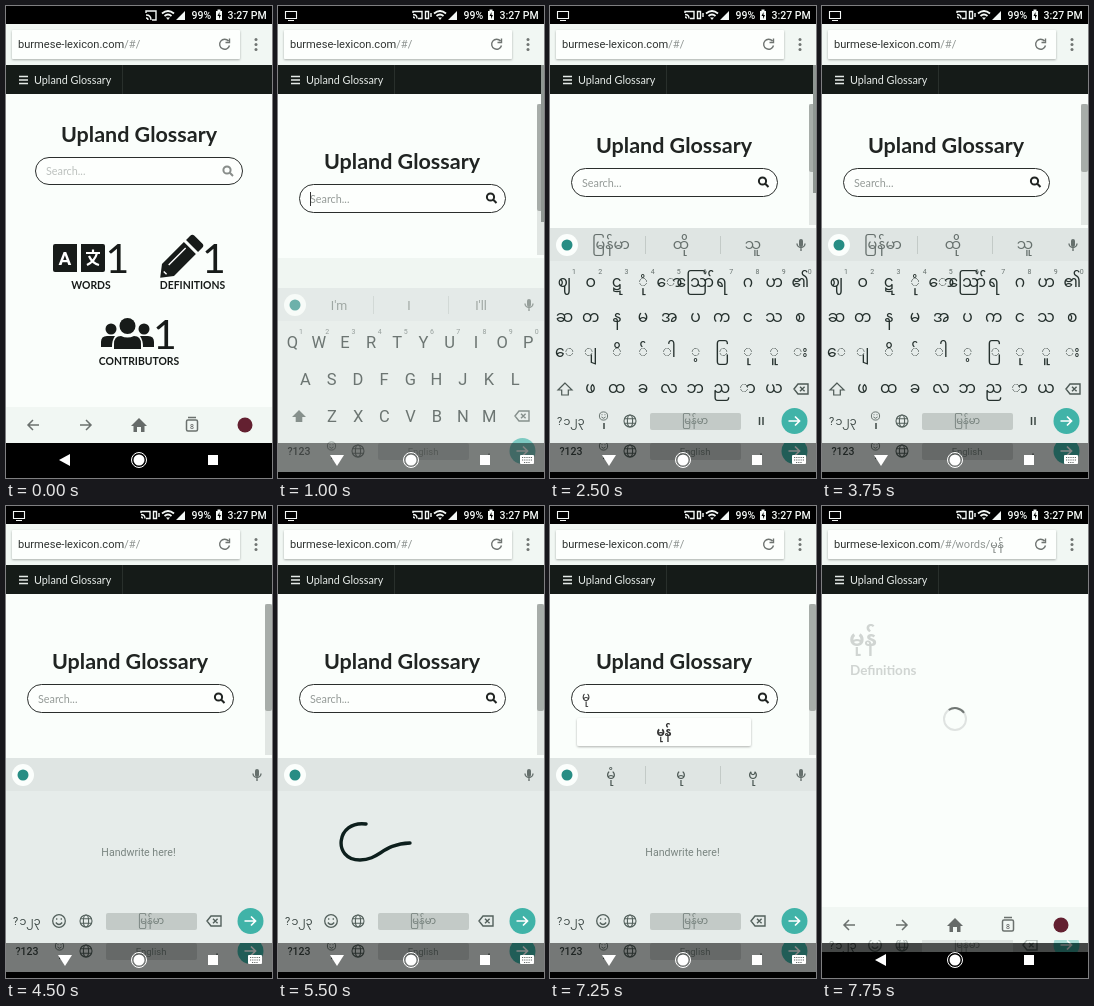
Animation, 266 px wide and 472 px high, one loop 8 s. Source, as an HTML page:

```html
<!DOCTYPE html>
<html lang="en">
<head>
<meta charset="utf-8">
<title>Dictionary on a phone</title>
<style>
html, body { margin: 0; height: 100%; overflow: hidden; background: #000; }
svg { display: block; width: 100vw; height: 100vh; }
text { font-family: Roboto, sans-serif; }
.lato { font-family: Lato, sans-serif; }
.b { font-weight: 700; }
.mid { text-anchor: middle; }
.my { font-family: "Noto Sans Myanmar", "Noto Sans", sans-serif; text-anchor: middle; }
.line { fill: none; stroke: currentColor; stroke-width: 1.4; }

.timed { animation: 8s step-end infinite; }
.cast { animation-name: cast; }
.screen { animation-name: screen; }
.home { animation-name: home; }
.typing { animation-name: typing; }
.content { animation-name: content; }
.tall { animation-name: tall; }
.short, .burmese { animation-name: short; }
.scrolled { animation-name: scrolled; }
.rescrolled { animation-name: rescrolled; }
.latin { animation-name: latin; }
.ghost { animation-name: ghost; }
.hand { animation-name: hand; }
.hint { animation-name: hint; }
.empty { animation-name: empty; }
.found { animation-name: found; }
.word { animation-name: word; }
@keyframes cast { 0% { opacity: 1 } 3.125%, to { opacity: 0 } }
@keyframes screen { 0% { opacity: 0 } 3.125%, to { opacity: 1 } }
@keyframes home { 0% { opacity: 1 } 12.5%, to { opacity: 0 } }
@keyframes typing { 0% { opacity: 0 } 12.5% { opacity: 1 } 93.75%, to { opacity: 0 } }
@keyframes content { 0% { transform: none } 28.125% { transform: translateY(-16px) } 50%, to { transform: none } }
@keyframes tall { 0% { opacity: 1 } 28.125% { opacity: 0 } 50%, to { opacity: 1 } }
@keyframes short { 0% { opacity: 0 } 28.125% { opacity: 1 } 50%, to { opacity: 0 } }
@keyframes scrolled { 0% { opacity: 0 } 12.5% { opacity: 1 } 15.625%, to { opacity: 0 } }
@keyframes rescrolled { 0% { opacity: 0 } 28.125% { opacity: 1 } 34.375%, to { opacity: 0 } }
@keyframes latin {
  0% { opacity: 0; transform: translateY(30px) }
  12.5% { opacity: .65; transform: translateY(30px) }
  15.625% { opacity: 1; transform: none }
  28.125%, to { opacity: 0; transform: none }
}
@keyframes ghost { 0% { opacity: 0 } 15.625% { opacity: 1 } 93.75%, to { opacity: 0 } }
@keyframes hand { 0% { opacity: 0 } 50% { opacity: 1 } 93.75%, to { opacity: 0 } }
@keyframes hint { 0% { opacity: 1 } 62.5% { opacity: 0 } 78.125%, to { opacity: 1 } }
@keyframes empty { 0% { opacity: 1 } 78.125%, to { opacity: 0 } }
@keyframes found { 0% { opacity: 0 } 78.125%, to { opacity: 1 } }
@keyframes word { 0% { opacity: 0 } 93.75%, to { opacity: 1 } }

.ink { fill: none; stroke: #0d1f1d; stroke-width: 3.4; stroke-linecap: round; stroke-linejoin: round; animation: slide 8s linear infinite; }
.ink path { stroke-dasharray: 1 2; animation: 8s linear infinite; }
.ink .s1 { animation-name: s1; }
.ink .s2 { animation-name: s2; }
.ink .s3 { animation-name: s3; }
@keyframes s1 { 0%, 62% { stroke-dashoffset: 1.2 } 68.75%, to { stroke-dashoffset: 0 } }
@keyframes s2 { 0%, 68.75% { stroke-dashoffset: 1.2 } 71.875%, to { stroke-dashoffset: 0 } }
@keyframes s3 { 0%, 71.875% { stroke-dashoffset: 1.2 } 75%, to { stroke-dashoffset: 0 } }
@keyframes slide {
  0%, 75% { transform: translateX(110px) }
  81.25% { transform: none }
  84.375%, to { transform: translateX(-110px) }
}
.spin { transform-origin: 133px 213px; animation: spin 1s linear -.25s infinite; }
@keyframes spin { to { transform: rotate(360deg) } }
</style>
</head>
<body>
<svg viewBox="0 0 266 472" preserveAspectRatio="none">
<defs>
  <clipPath id="below"><rect y="437" width="266" height="29"/></clipPath>
  <clipPath id="edge"><rect y="434" width="266" height="12"/></clipPath>
  <clipPath id="keys"><rect y="252" width="266" height="214"/></clipPath>
  <filter id="shade" x="-5%" y="-20%" width="110%" height="150%"><feDropShadow dx="0" dy="1" stdDeviation="1" flood-opacity=".3"/></filter>
  <g id="lens" class="line" style="stroke-width:2"><circle r="3.6" cx="-1" cy="-1"/><path d="M1.8 1.8 5 5"/></g>
  <g id="globe" class="line" style="stroke-width:1.1"><circle r="6"/><ellipse rx="2.6" ry="6"/><path d="M-5.5-2.2H5.5M-5.5 2.2H5.5"/></g>
  <g id="smile" class="line" style="stroke-width:1.3"><circle r="6.3"/><path d="M-3.2 1.5Q0 5.5 3.2 1.5M-2.3-2.7v1.5M2.3-2.7v1.5"/></g>
  <path id="erase" class="line" d="M-7 0-3-5H7V5H-3ZM-1-2.3 3.6 2.3M3.6-2.3-1 2.3"/>
  <path id="shift" d="M0-6-7 1H-3.3V6H3.3V1H7Z"/>
  <g id="mic"><rect x="-2" y="-6" width="4" height="8" rx="2"/><path class="line" d="M-4-1.5a4 4 0 0 0 8 0M0 3V6"/></g>
  <g id="strip">
    <rect width="266" height="33" fill="#dfe5e3"/>
    <circle cx="17" cy="17" r="11" fill="#fbfefc"/><circle cx="17" cy="17" r="5.5" fill="#278d84"/>
    <use href="#mic" x="251" y="17" fill="#66706d" color="#66706d"/>
  </g>
  <path id="bars" d="M95.5 8v18M170.5 8v18" stroke="#c3cac7"/>
  <g id="base" color="#53605c">
    <use href="#globe" x="80" y="415"/>
    <rect x="100" y="407" width="91" height="17" rx="2" fill="#c3cac7"/>
    <circle cx="244.5" cy="415" r="13" fill="#40b3a8"/>
    <path d="M238.5 415h11M245 410.5l4.500 4.500-4.500 4.500" fill="none" stroke="#fff" stroke-width="1.700"/>
  </g>
  <use id="smallSmile" href="#smile" transform="translate(53.500 410) scale(.65)"/>
  <g id="latinRow" fill="#3c4744" color="#53605c">
    <use href="#base"/><use href="#smallSmile"/>
    <text class="mid" x="21" y="419" font-size="10.500" font-weight="500">?123</text>
    <text class="mid" x="54" y="421" font-size="13">,</text>
    <text class="mid" x="145" y="419" font-size="9.500" fill="#75807c">English</text>
    <text class="mid" x="211" y="419" font-size="14">.</text>
  </g>
  <g id="digits" fill="#3c4744">
    <text x="7" y="419" font-size="11">?</text><text class="my" x="24" y="419" font-size="11">၁၂၃</text>
    <text class="my" x="145" y="418" font-size="10" fill="#75807c">မြန်မာ</text>
  </g>
  <g id="handRow" color="#53605c">
    <use href="#base"/><use href="#digits"/>
    <use href="#smile" x="53" y="415"/><use href="#erase" x="208" y="415"/>
  </g>
  <g id="homeKeys" fill="#fff">
    <circle cx="133" cy="454" r="5.500"/><circle cx="133" cy="454" r="7.500" fill="none" stroke="#fff"/>
    <rect x="202" y="449" width="10" height="10"/>
  </g>
  <g id="softNav"><use href="#homeKeys"/><path d="M53 454 64 448V460Z" fill="#fff"/></g>
  <g id="toolbar">
    <rect y="401" width="266" height="36" fill="#f1f7f3"/>
    <g class="line" color="#6b716e" style="stroke-width:1.500">
      <path d="M33 419H22M27 414l-5 5 5 5"/><path d="M74 419H85M80 414l5 5-5 5"/>
      <rect x="180.500" y="414" width="11" height="11" rx="1.500"/><path d="M182 411.500h8"/>
    </g>
    <path d="M125 420 133 412 141 420H138.500V426H135V421H131V426H127.500V420Z" fill="#666b69"/>
    <text class="mid" x="186" y="422.500" font-size="7" fill="#555">8</text>
    <circle cx="239" cy="419" r="7.500" fill="#632030"/>
  </g>
</defs>

<rect width="266" height="472" fill="#fafefb"/>
<rect y="18" width="266" height="41" fill="#f1f7f3"/>
<rect x="6" y="24" width="228" height="29" rx="1" fill="#fdfffd" filter="url(#shade)"/>
<text x="12" y="42" font-size="11.100" fill="#303432">burmese-lexicon.com<tspan fill="#909693">/#/</tspan></text>
<path class="line" color="#707572" d="M222.500 35A5 5 0 1 0 223.500 39.500M223.500 32.500V36.500H219.500"/>
<g fill="#707572"><circle cx="250" cy="33.500" r="1.500"/><circle cx="250" cy="38.500" r="1.500"/><circle cx="250" cy="43.500" r="1.500"/></g>
<rect y="59" width="266" height="29" fill="#151b18"/>
<path d="M116.500 59V88" stroke="#29302c"/>
<path d="M13 70.500h9M13 74h9M13 77.500h9" stroke="#e6ebe8" stroke-width="1.500"/>
<text class="lato" x="28" y="78" font-size="10.800" fill="#e6ebe8">Upland Glossary</text>

<g class="timed home">
  <text class="lato b mid" x="133" y="136" font-size="21.500" fill="#202422">Upland Glossary</text>
  <rect x="29.500" y="151.500" width="207" height="27" rx="13.500" fill="#fdfffd" stroke="#2a2e2c"/>
  <text class="lato" x="40" y="169" font-size="10.800" fill="#bcc1be">Search...</text>
  <use href="#lens" x="222" y="165" color="#888d8a"/>
  <g fill="#171b19">
    <path d="M49 238H71V266H49a2 2 0 0 1-2-2V240a2 2 0 0 1 2-2ZM75 238H97a2 2 0 0 1 2 2V264a2 2 0 0 1-2 2H75Z"/>
    <text class="b mid" x="59" y="258.500" font-size="19" fill="#fff">A</text>
    <path d="M80 247H94M87 243.500V247M91 247Q89 255 81 259M83 250Q86 257 93 259" fill="none" stroke="#fff" stroke-width="2.200"/>
    <g transform="translate(174 252) rotate(-45)">
      <path d="M-28 0-17-8.500H14V8.500H-17ZM17-8.500H23a3 3 0 0 1 3 3V5.500a3 3 0 0 1-3 3H17Z"/>
      <path d="M-13-3H11M-21-2V2" stroke="#fff" stroke-width="1.400"/>
    </g>
    <circle cx="105" cy="323" r="5.500"/><circle cx="138" cy="323" r="5.500"/>
    <path d="M95 341V336q0-6 6-6h8q-3 4-3 11ZM148 341V336q0-6-6-6h-8q3 4 3 11Z"/>
    <circle cx="121.500" cy="320" r="8"/>
    <path d="M108 343V338q0-8 7-8 6.500 3 13 0 7 0 7 8V343Z"/>
    <g class="mid" font-size="41"><text class="lato" x="111.500" y="267">1</text><text class="lato" x="208" y="267">1</text><text class="lato" x="159" y="343">1</text></g>
    <g class="mid" font-size="10.400"><text class="lato b" x="85" y="283">WORDS</text><text class="lato b" x="186.500" y="283">DEFINITIONS</text><text class="lato b" x="133" y="359">CONTRIBUTORS</text></g>
  </g>
  <use href="#toolbar"/>
  <rect y="437" width="266" height="35"/>
  <use href="#softNav"/>
</g>

<g class="timed typing">
  <g class="timed content">
    <text class="lato b mid" x="124" y="163" font-size="21.500" fill="#202422">Upland Glossary</text>
    <rect x="21.500" y="178.500" width="206" height="28" rx="14" fill="#fdfffd" stroke="#2a2e2c"/>
    <text class="lato timed empty" x="32" y="196.500" font-size="10.800" fill="#949a97">Search...</text>
    <path class="timed scrolled" d="M32.500 186V200" stroke="#333"/>
    <use href="#lens" x="213.500" y="192" color="#202422"/>
  </g>
  <g class="timed found" fill="#333">
    <text class="my" x="36" y="195" font-size="12">မု</text>
    <rect x="27" y="212" width="174" height="28" rx="2" fill="#fdfffd" filter="url(#shade)"/>
    <text class="my b" x="114" y="230" font-size="12">မုန်</text>
  </g>
  <g class="timed tall"><rect x="259" y="98" width="7" height="151" fill="#e1e6e3"/><rect x="259" y="98" width="7" height="107" rx="2" fill="#a7ada9"/></g>
  <g class="timed short"><rect x="259" y="98" width="7" height="121" fill="#e1e6e3"/><rect x="259" y="98" width="7" height="68" rx="2" fill="#a7ada9"/></g>
  <rect class="timed scrolled" x="263" y="59" width="3" height="157" fill="#8f9692"/>
  <rect class="timed rescrolled" x="263" y="59" width="3" height="128" fill="#8f9692"/>
  <rect y="252" width="266" height="214" fill="#f0f6f2"/>

  <g clip-path="url(#keys)"><g class="timed latin">
    <rect y="252" width="266" height="214" fill="#e6ecea"/>
    <use href="#strip" y="252"/><use href="#bars" y="252"/>
    <g class="mid" font-size="12.500" fill="#737d79"><text x="61" y="273.500">I'm</text><text x="131" y="273.500">I</text><text x="203" y="273.500">I'll</text></g>
    <g id="latinKeys" fill="#25302d" font-size="16.500"></g>
    <use href="#shift" x="21" y="380" fill="#4d5955"/><use href="#erase" x="244" y="380" color="#4d5955"/>
    <use href="#latinRow"/>
  </g></g>

  <g class="timed burmese">
    <rect y="222" width="266" height="244" fill="#e6ecea"/>
    <use href="#strip" y="222"/><use href="#bars" y="222"/>
    <g fill="#66706d" font-size="14.500"><text class="my" x="61" y="243">မြန်မာ</text><text class="my" x="131" y="243">ထို</text><text class="my" x="203" y="243">သူ</text></g>
    <g id="burmeseKeys" fill="#25302d" font-size="15.500"></g>
    <use href="#shift" class="line" x="15" y="383" color="#4d5955" style="stroke-width:1.200"/><use href="#erase" x="251" y="383" color="#4d5955"/>
    <use href="#base"/><use href="#digits"/>
    <g color="#53605c"><use href="#smallSmile"/></g>
    <path d="M54 417v6M209.500 411v8M213 411v8" stroke="#3c4744" stroke-width="1.500"/>
  </g>

  <g class="timed hand">
    <rect y="252" width="266" height="214" fill="#e6ecea"/>
    <use href="#strip" y="252"/>
    <g class="timed found" fill="#4d5955" font-size="14"><use href="#bars" y="252"/><text class="my" x="61" y="273">မုံ</text><text class="my" x="131" y="273">မု</text><text class="my" x="203" y="273">ဗု</text></g>
    <text class="mid timed hint" x="132.500" y="350" font-size="10.600" fill="#7a8581">Handwrite here!</text>
    <g clip-path="url(#keys)"><g class="ink">
      <path class="s1" pathLength="1" d="M-22 318C-52 314-56 354-28 354C-8 354-6 338 22 337"/>
      <path class="s2" pathLength="1" d="M26 312C40 319 38 334 26 344Q16 350 0 353"/>
      <path class="s3" pathLength="1" d="M22 359Q12 366 9 378Q8 386 17 384L30 379"/>
    </g></g>
    <use href="#handRow"/>
  </g>

  <g class="timed ghost" clip-path="url(#below)"><rect y="437" width="266" height="29" fill="#e0e6e4"/><use href="#latinRow" y="30"/></g>
  <rect y="437" width="266" height="29" opacity=".48"/>
  <rect y="466" width="266" height="6"/>
  <use href="#homeKeys"/>
  <path d="M52 449H66L59 460Z" fill="#fff"/>
  <rect x="242" y="449" width="14" height="9" rx="1" fill="#fff"/>
  <path d="M244 451.500h10M244 454h10M246 456.500h6" stroke="#626967" stroke-dasharray="1.200 1"/>
</g>

<g class="timed word">
  <text x="133.500" y="42" font-size="11.100" fill="#909693">words/</text>
  <text class="my" x="175" y="42" font-size="11" fill="#7c827f">မုန်</text>
  <g fill="#d0d5d2"><text class="my b" x="41" y="140" font-size="22">မုန်</text><text class="lato b" x="28" y="169" font-size="13.500">Definitions</text></g>
  <circle cx="133" cy="213" r="11" fill="none" stroke="#dfe3e1" stroke-width="2"/>
  <path class="spin" d="M126.700 204A11 11 0 0 1 142 206.700" fill="none" stroke="#6f7572" stroke-width="2"/>
  <use href="#toolbar"/>
  <rect y="437" width="266" height="35"/>
  <g clip-path="url(#edge)" opacity=".4"><rect y="437" width="266" height="9" fill="#aab1ae"/><use href="#handRow" y="24"/></g>
  <use href="#softNav"/>
</g>

<rect width="266" height="18"/>
<g fill="#f4f8f6" color="#f4f8f6">
  <g class="timed cast"><path class="line" d="M140 7V5h10v9h-4M140 9q5 0 5 5M140 12q2 0 2 2"/></g>
  <g class="timed screen">
    <path class="line" style="stroke-width:1.100" d="M7.500 5.500h11v7h-11ZM10 14.500h6"/>
    <path class="line" d="M135 7V5.500h9v7h-4M135 8.500q4 0 4 4M135 11q1.500 0 1.500 1.500M147.500 5.500h3v7h-3ZM153 7v4"/>
  </g>
  <path class="line" style="stroke-width:1.800" d="M156 7.500Q162 2.500 168 7.500M158.500 10Q162 7 165.500 10"/>
  <path d="M160 11.500h4L162 14ZM170 14h9V5Z"/>
  <text x="185.500" y="13" font-size="10.500" font-weight="500">99%</text>
  <path d="M210 5h1.500V3.500h3V5H216V14h-6Z"/><path d="M213.500 6 211.500 10h1.500v3l2-4h-1.500Z" fill="#000"/>
  <text x="221.500" y="13" font-size="10.500" font-weight="500">3:27 PM</text>
</g>
</svg>

<script>
const step = 26.2;
const row = (cls, keys, x, y) => keys.split(' ')
  .map((key, i) => `<text class="${cls}" x="${x + i * step}" y="${y}">${key}</text>`).join('');
const numbers = (x, y) => `<g font-size="7" fill="#66706d">${row('mid', '1 2 3 4 5 6 7 8 9 0', x, y)}</g>`;
const fill = (id, html) => { document.getElementById(id).innerHTML = html; };

fill('latinKeys', numbers(23, 298)
  + row('mid', 'Q W E R T Y U I O P', 14.5, 311.5)
  + row('mid', 'A S D F G H J K L', 27.5, 348.5)
  + row('mid', 'Z X C V B N M', 54, 386));

fill('burmeseKeys', numbers(24, 268)
  + row('my', 'ဈ ဝ ဋ ုံ ော ဪ ရ ဂ ဟ ၏', 14.5, 281)
  + row('my', 'ဆ တ န မ အ ပ က င သ စ', 14.5, 316)
  + row('my', 'ေ ျ ိ ် ါ ့ ြ ု ူ း', 14.5, 351)
  + row('my', 'ဖ ထ ခ လ ဘ ည ာ ယ', 40.5, 387));
</script>
</body>
</html>
```
